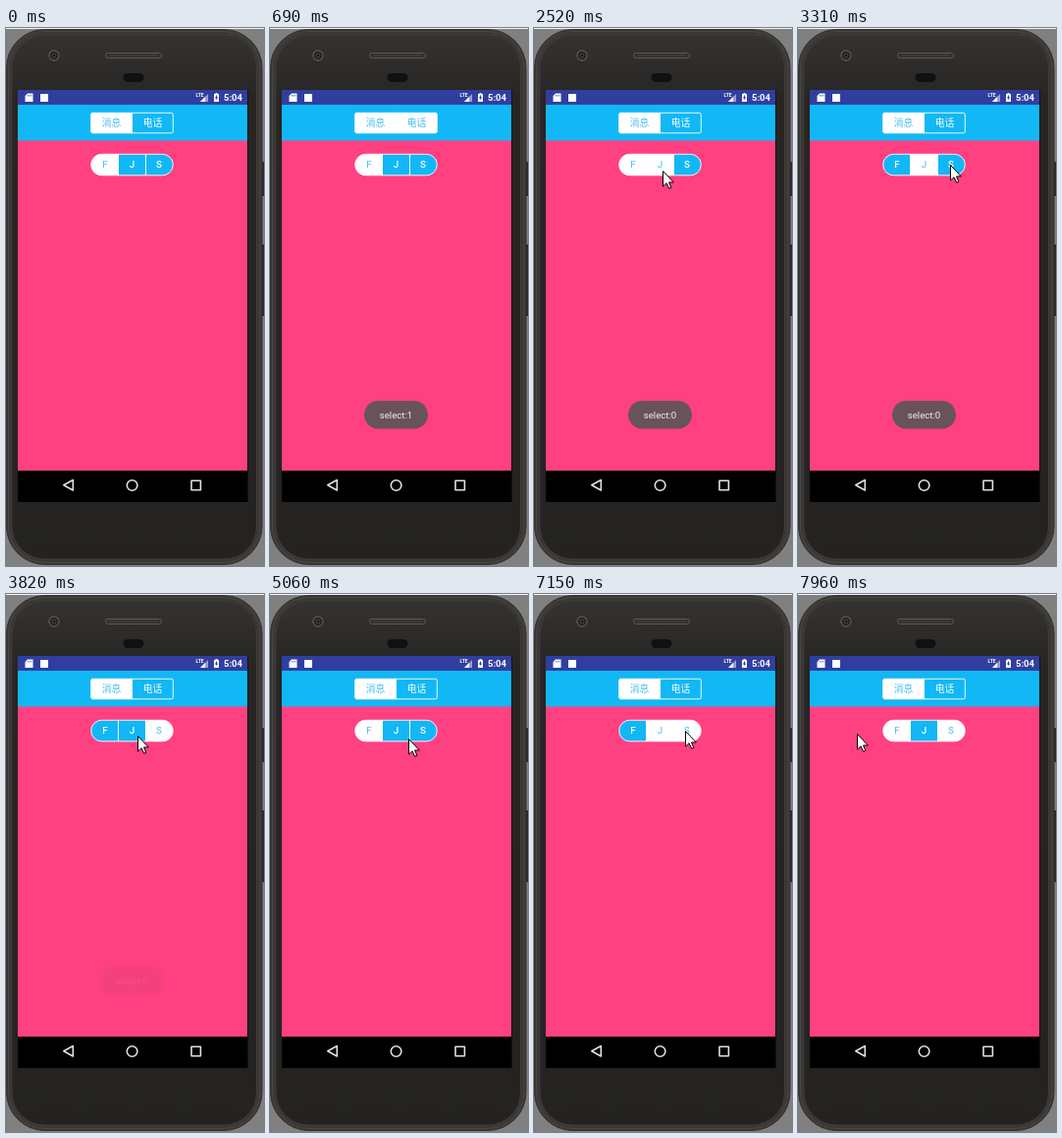
Recreate the animation shown at these times as an HTML page. Size 263x547 px, loop 8000 ms.

```html
<!DOCTYPE html>
<html>
<head>
<meta charset="utf-8">
<style>
html, body { margin: 0; width: 100%; height: 100%; overflow: hidden; background: #808080; }
svg { display: block; width: 263px; height: 547px; }
text { font-family: Roboto, "Noto Sans CJK SC", "Noto Sans CJK", sans-serif; text-anchor: middle; }
.seg path { fill: #12b7f5; stroke: #fff; stroke-width: .9; }
.seg text { fill: #fff; font-size: 9.8px; font-weight: 500; }
.seg .on path { fill: #fff; }
.seg .on text { fill: #45bdf0; font-weight: 400; }
</style>
</head>
<body>
<svg viewBox="0 0 263 547">
  <defs>
    <linearGradient id="face" x2="0" y2="1">
      <stop offset="0" stop-color="#353331"/>
      <stop offset=".12" stop-color="#282624"/>
      <stop offset="1" stop-color="#242321"/>
    </linearGradient>
  </defs>

  <!-- phone body -->
  <path d="M0 .5h263" stroke="#f4f4f4"/>
  <path d="M262 136v35M262 220v73" stroke="#2c2a28" stroke-width="2"/>
  <rect x=".5" y="1.500" width="260.500" height="544" rx="39" fill="#3a3735" stroke="#34312f"/>
  <rect x="2.500" y="3.500" width="256.500" height="540" rx="37" fill="none" stroke="#4b4744"/>
  <rect x="6" y="7" width="249.500" height="533" rx="33" fill="url(#face)" stroke="#3f3b38"/>
  <circle cx="49" cy="28" r="5" fill="#242321" stroke="#565451" stroke-width="1.400"/>
  <circle cx="49" cy="28" r="2" fill="#1a1918" stroke="#4a4845"/>
  <rect x="101.500" y="25.500" width="57" height="5" rx="2.500" fill="#2f2e2c" stroke="#5d5b57"/>
  <path d="M105 28h50" stroke="#4a4845"/>
  <rect x="119.500" y="46" width="21" height="9" rx="4.500" fill="#111"/>

  <!-- screen -->
  <rect x="12" y="63" width="234.500" height="419" fill="#000"/>
  <rect x="12" y="78" width="234" height="372" fill="#ff4081"/>
  <rect x="12" y="63" width="234" height="51.500" fill="#12b7f5"/>
  <rect x="12" y="63" width="234" height="15" fill="#303f9f"/>

  <!-- status bar -->
  <path d="M22 66.500h5.500v8.500h-8v-6z" fill="#fff"/>
  <path d="M22.500 68v1.500M24.200 68v1.500M25.900 68v1.500" stroke="#303f9f" stroke-width=".7"/>
  <rect x="35" y="67" width="8" height="8" fill="#fff"/>
  <text x="197.500" y="70" font-size="5" font-weight="700" fill="#fff">LTE</text>
  <path d="M206 67v8h-8z" fill="#fff" opacity=".5"/>
  <path d="M203 70v5h-5z" fill="#fff"/>
  <path d="M213.500 67v-1h2v1h1.500v8h-5v-8z" fill="#fff"/>
  <path d="M214.500 68.500v4M213 71h3" stroke="#303f9f"/>
  <text x="231.500" y="74" font-size="9.500" font-weight="700" fill="#fff">5:04</text>

  <!-- navigation bar -->
  <g fill="none" stroke="#e0e0e0" stroke-width="1.600" stroke-linejoin="round">
    <path d="M68.300 459.500v10.500l-9.500-5.250z"/>
    <circle cx="128.600" cy="465" r="5.300"/>
    <rect x="189" y="460.300" width="9.400" height="9.400"/>
  </g>

  <g class="seg">
    <g id="msg"><path d="M128.500 86.300v20.500h-40q-1.800 0-1.800-1.800v-17q0-1.700 1.800-1.700z"/><text x="107.500" y="99.500">消息</text></g>
    <g id="tel"><path d="M128.500 86.300v20.500h40q1.800 0 1.800-1.800v-17q0-1.700-1.800-1.700z"/><text x="149.500" y="99.500">电话</text></g>
  </g>
  <g class="seg">
    <g id="f"><path d="M114.500 128.300v21.500h-17a10.750 10.750 0 0 1 0-21.500z"/><text x="101" y="142">F</text></g>
    <g id="j"><path d="M114.500 128.300h28v21.500h-28z"/><text x="128.500" y="142">J</text></g>
    <g id="s"><path d="M142.500 128.300v21.500h17a10.750 10.750 0 0 0 0-21.500z"/><text x="156" y="142">S</text></g>
  </g>

  <g id="toast">
    <rect x="96" y="379" width="65" height="28.500" rx="14.250" fill="#68535a"/>
    <text id="note" x="128.500" y="397" font-size="9.600" fill="#f0eeee"></text>
  </g>

  <path id="cursor" d="M.5.5v15.500l3.600-3.300 2.500 5.500 2.300-1-2.400-5.300h4.800z" fill="#fff" stroke="#000"/>
</svg>
<script>
const LOOP = 8000;
const TICK = 135;
const LAG = 130;  // a released button clears this long after the new one fills
const $ = id => document.getElementById(id);

const groups = [
  { msg: [0, 690], tel: [140] },
  { f: [0, 4780, 7960], j: [2520, 4080, 6050], s: [3430, 7150] }
];

// Pointer key points: time, x, y
const path = [
  [1430, 85, 99], [1860, 103, 147], [2380, 131, 145], [2780, 131, 145],
  [3310, 155, 139], [3670, 159, 141], [3820, 134, 144], [4780, 97, 140],
  [5060, 141, 147], [5340, 156, 145], [5900, 130, 144], [6610, 130, 144],
  [7150, 154, 139], [7570, 157, 143], [7960, 60, 142]
];

function pressed(group, t) {
  let last = -1, id;
  for (const key in group)
    for (const time of group[key])
      if (time <= t && time > last) [last, id] = [time, key];
  return id;
}

function pointer(t) {
  const i = path.filter(p => p[0] <= t).length - 1;
  if (i < 0) return null;
  const [t0, x0, y0] = path[i];
  const [t1, x1, y1] = path[i + 1] || [LOOP, x0, y0];
  const k = Math.floor((t - t0) / TICK) * TICK / (t1 - t0);
  return [x0 + (x1 - x0) * k, y0 + (y1 - y0) * k].map(Math.round);
}

function toastAlpha(t) {
  if (t < 290) return 0;
  const fade = Math.min(1, Math.max(0, (t - 3450) / 500));
  return (1 - fade) ** 2;
}

function draw(t) {
  for (const group of groups) {
    const lit = [pressed(group, t), pressed(group, Math.max(0, t - LAG))];
    for (const id in group) $(id).classList.toggle('on', lit.includes(id));
  }
  $('toast').style.opacity = toastAlpha(t);
  $('note').textContent = t < 1430 ? 'select:1' : 'select:0';
  const p = pointer(t);
  $('cursor').style.display = p ? '' : 'none';
  if (p) $('cursor').setAttribute('transform', `translate(${p})`);
}

const begin = performance.now();
function frame() {
  draw((performance.now() - begin) % LOOP);
  requestAnimationFrame(frame);
}
frame();
</script>
</body>
</html>
```
